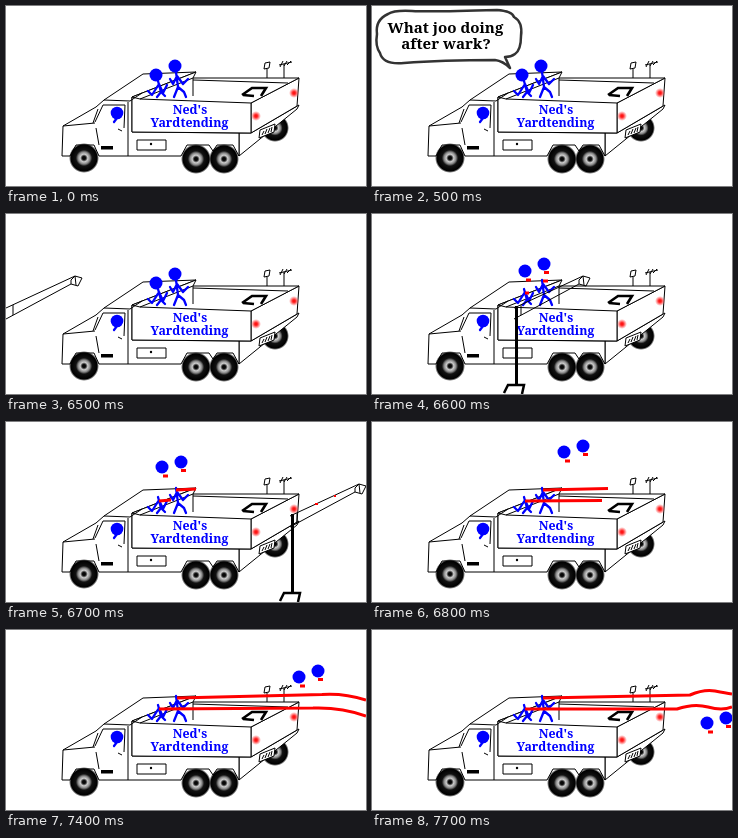
Recreate the animation shown at these times as an HTML page. Size 360 px wide and 180 px high, loop 8000 ms.

```html
<!DOCTYPE html>
<html lang="en">
<head>
<meta charset="utf-8">
<title>Truck ride</title>
<style>
html, body { margin: 0; width: 100%; height: 100%; overflow: hidden; background: #fff; }
svg { display: block; width: 100vw; height: 100vh; }
text { font-family: "Noto Serif", "DejaVu Serif", serif; font-weight: 700; text-anchor: middle; }
.line { fill: none; stroke: #000; stroke-width: 1; }
.panel { fill: #fff; stroke: #000; stroke-width: 1; }
.blue { fill: none; stroke: #00f; stroke-width: 2.3; stroke-linecap: round; stroke-linejoin: round; }
.head { fill: #00f; }
.red { fill: none; stroke: #f00; stroke-width: 3; }
</style>
</head>
<body>
<svg viewBox="0 0 360 180">
  <defs>
    <radialGradient id="tyre">
      <stop offset="0" stop-color="#000"/>
      <stop offset=".12" stop-color="#111"/>
      <stop offset=".25" stop-color="#ccc"/>
      <stop offset=".4" stop-color="#888"/>
      <stop offset=".54" stop-color="#111"/>
      <stop offset=".87" stop-color="#000"/>
      <stop offset="1" stop-color="#000" stop-opacity="0"/>
    </radialGradient>
    <radialGradient id="lamp">
      <stop offset="0" stop-color="#f00"/>
      <stop offset=".35" stop-color="#f33"/>
      <stop offset="1" stop-color="#f55" stop-opacity="0"/>
    </radialGradient>
    <circle id="wheel" r="15" fill="url(#tyre)"/>
    <circle id="light" r="5" fill="url(#lamp)"/>
  </defs>

  <g id="truck">
    <circle cx="269" cy="122" r="14" fill="url(#tyre)"/>
    <path class="panel" d="M233 127L245 127 293 99 291 103 233 150Z"/>
    <path class="panel" d="M245 97L293 72 291 100 245 127Z"/>
    <path class="panel" d="M57 120L90 101 98 94 137 68 190 66 126 91 126 126 233 127 233 150 227 139H211L207 145 203 139H181L175 150H93L88 139H70L64 150H56Z"/>
    <path class="panel" d="M126 91L190 66 187 72 293 72 245 97 245 127 126 126Z"/>
    <path class="line" d="M126 91L134 93 245 97M134 93L187 72M187 72V90M187 74L282 77M98 94L124 95 136 87M89 116L97 99H119L118 122M122 96V150M57 120L89 117M90 122L93 139M112 123L116 125"/>
    <path class="line" d="M87 117L92 103" stroke-width="2"/>
    <path class="line" d="M131 134H160V144H131Z"/>
    <circle cx="145" cy="138" r="1.2"/>
    <rect x="95" y="140" width="12" height="3.5"/>
    <path d="M236 89L246 82H260L255 90M237 89L248 90" fill="none" stroke="#000" stroke-width="2.6"/>
    <path class="panel" d="M254 124L269 118 268 126 253 132Z"/>
    <path class="line" d="M256 129L258 125M259 128L261 123M262 127L264 122M265 126L266 121"/>
    <path class="line" d="M261 72V63M259 57L264 56 263 62 258 63ZM278 72V58M273 59L286 56M274 61L277 55M278 60L281 55M281 59L285 55"/>
    <use href="#light" x="250" y="110"/>
    <use href="#light" x="288" y="87"/>
    <use href="#wheel" x="78" y="152"/>
    <use href="#wheel" x="190" y="153"/>
    <use href="#wheel" x="218" y="153"/>
    <circle class="head" cx="111" cy="107" r="6.3"/>
    <path class="blue" d="M111 112L108 116"/>
    <g fill="#00f" font-size="12.4">
      <text x="184" y="108">Ned's</text>
      <text x="183.5" y="120.5">Yardtending</text>
    </g>
  </g>

  <g class="blue">
    <path d="M152 75L155 86 151 91M155 86L159 90M142 85L146 89 153 78 157 87 161 79"/>
    <path d="M170 66L172 81 168 91M172 81L178 86 180 91M164 73L167 78 171 70 177 78 182 73"/>
  </g>

  <path id="blood" class="red"/>
  <g id="heads">
    <circle class="head" cx="0" cy="0" r="6.5"/>
    <circle class="head" id="second" r="6.5"/>
    <path id="drips" class="red" stroke-width="2"/>
  </g>

  <g id="beam">
    <path class="line" d="M-65 94L4 62 11 64 7 72 0 70-65 105M0 70L0 66 4 62 5 71M-58 91V101"/>
    <g id="post">
      <path d="M-62.5 92V171" fill="none" stroke="#000" stroke-width="3"/>
      <path d="M-75 179L-71 171H-55L-57 180" fill="none" stroke="#000" stroke-width="2.5"/>
    </g>
    <path id="spots" d="M-40 82H-37M-21 74H-19" stroke="#f00" stroke-width="2"/>
  </g>

  <g id="speech">
    <path d="M16 8Q22 4 40 5T125 4Q140 5 142 11Q151 16 149 30Q149 44 143 48Q139 51 133 51L138 62Q131 55 123 54Q70 54 32 57Q11 59 8 47Q3 40 5 28Q3 14 16 8Z" fill="#fff" stroke="#333" stroke-width="2.5" stroke-linejoin="round"/>
    <g font-size="15.1">
      <text x="73.5" y="27">What joo doing</text>
      <text x="74" y="43">after wark?</text>
    </g>
  </g>
</svg>
<script>
const LOOP = 8000;
const el = id => document.getElementById(id);
const show = (id, on) => el(id).setAttribute("display", on ? "inline" : "none");
const place = (id, x, y) => el(id).setAttribute("transform", `translate(${x} ${y})`);

// Each pose holds until the next: start, left head x and y, height of right head, blood path
const poses = [
  [0, 150, 69, -9, ""],
  [6600, 153, 57, -7, "M171 67H176M153 79H157"],
  [6700, 156, 45, -5, "M170 68L190 67M153 79L165 78"],
  [6800, 192, 30, -6, "M171 68L236 66.5M153 79L230 78.5"],
  [7100, 249, 31, -5, "M171 68L316 64.5M153 79L307 78"],
  [7400, 293, 47, -6, "M171 68L316 64.5Q338 63 360 70M153 79L307 78Q335 77 360 86"],
  [7700, 335, 93, -5, "M171 68L318 65Q332 59 343 61T360 64M153 79L305 79Q322 73 336 77T360 77"]
];

function draw(t) {
  const [start, x, y, dy, blood] = poses.findLast(p => t >= p[0]);
  place("heads", x, y);
  place("second", 19, dy);
  el("drips").setAttribute("d", `M1 9H6M19 ${dy + 8.5}H24`);
  show("drips", start > 0);
  el("blood").setAttribute("d", blood);

  const step = Math.floor((t - 6500) / 100);
  show("beam", step >= 0 && step < 3);
  place("beam", 65 + 142 * step, 0);
  show("post", step > 0);
  show("spots", step === 2);
  show("speech", t >= 500 && t < 4500);
}

const began = performance.now();
function tick() {
  draw((performance.now() - began) % LOOP);
  requestAnimationFrame(tick);
}
tick();
</script>
</body>
</html>
```
